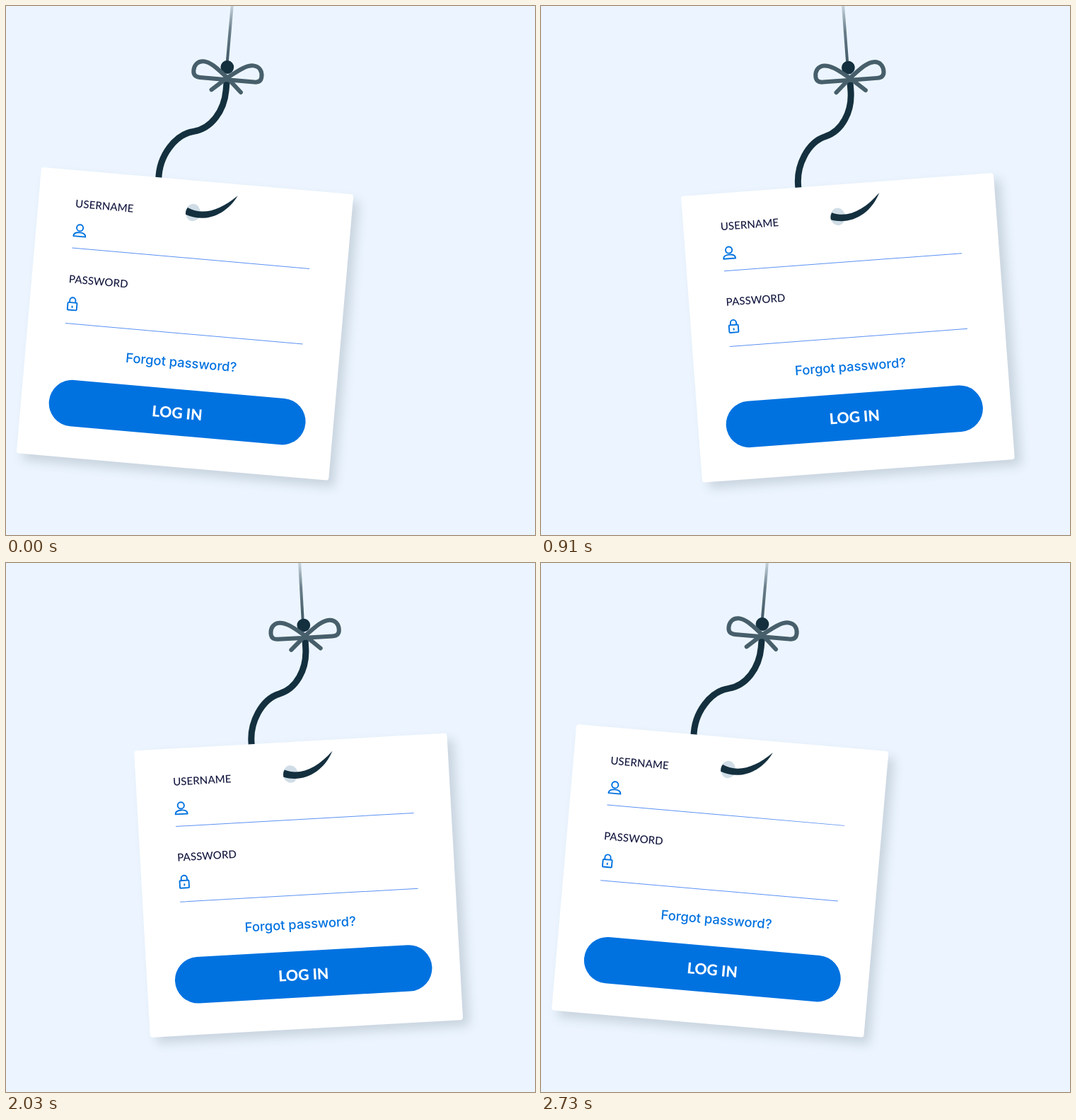
An HTML page for the animation above (2800 ms loop, 748x748 px).

```html
<!DOCTYPE html>
<html lang="en">
<head>
<meta charset="utf-8">
<title>Login on a hook</title>
<style>
  html, body { margin: 0; width: 100%; height: 100%; overflow: hidden; background: #ecf5ff; }
  svg { display: block; width: 100vw; height: 100vh; }
  text { font-family: Lato, sans-serif; }
  .label { font-size: 15px; font-weight: 500; letter-spacing: .1px; fill: #14183f; }
  .link { font: 500 18.4px Inter, sans-serif; fill: #0072e0; text-anchor: middle; }
  .action { font-size: 21.3px; font-weight: 800; fill: #fff; text-anchor: middle; }
  .icon { fill: none; stroke: #0072e0; stroke-width: 1.9; stroke-linejoin: round; }
  .bow { fill: none; stroke: #475f6b; stroke-width: 6; stroke-linecap: round; stroke-linejoin: round; }
</style>
</head>
<body>
<svg viewBox="0 0 748 748">
  <defs>
    <linearGradient id="fade" gradientUnits="userSpaceOnUse" x1="0" y1="0" x2="0" y2="75">
      <stop offset="0" stop-color="#475f6b" stop-opacity=".2"/>
      <stop offset=".5" stop-color="#475f6b" stop-opacity=".8"/>
      <stop offset="1" stop-color="#475f6b"/>
    </linearGradient>
    <filter id="blur" x="-20%" y="-20%" width="140%" height="140%">
      <feGaussianBlur stdDeviation="7.5"/>
    </filter>
    <path id="loop" d="M359 123L380 104C392 95 404 84 415 84C424 84 428 91 428 98C428 104 425 107 418 107H380"/>
  </defs>
  <g id="swing">
    <!-- line, bow and shank -->
    <rect x="375.7" y="-10" width="4" height="95" fill="url(#fade)"/>
    <circle cx="378.4" cy="89.3" r="9.4" fill="#14303f"/>
    <path d="M379.5 104V122C379.5 152 363 178 339 184C314 190 293 222 295.6 256" fill="none" stroke="#14303f" stroke-width="9"/>
    <g class="bow">
      <use href="#loop"/>
      <use href="#loop" transform="matrix(-1 0 0 1 759.5 0)"/>
    </g>

    <!-- card -->
    <rect x="138" y="262" width="443" height="406" rx="4" fill="#14303f" opacity=".17" filter="url(#blur)"/>
    <rect x="129" y="253" width="443" height="406" rx="4" fill="#fff"/>
    <ellipse cx="348" cy="298.3" rx="10.3" ry="12.3" fill="#d0dde6"/>
    <path d="M340 292C362 302 386 292 409 269C395 298 366 312 338 302Q337 296 340 292Z" fill="#14303f"/>

    <!-- form -->
    <text class="label" x="181.5" y="305.3">USERNAME</text>
    <text class="label" x="181.5" y="412.3">PASSWORD</text>
    <path d="M182 363H519M182 470H519" stroke="#5b92f3"/>
    <g class="icon">
      <circle cx="190.8" cy="333.9" r="4.6"/>
      <path d="M182.5 346C182.5 342 185.5 340.5 191 340.5S199.5 342 199.5 346Z"/>
      <rect x="183" y="440" width="13" height="10.6" rx="1"/>
      <path d="M185.4 440V437A4.1 4.1 0 0 1 193.6 437V440M189.5 444.5V447.5"/>
    </g>
    <text class="link" x="350" y="517.5">Forgot password?</text>
    <rect x="168.5" y="549" width="364" height="65.5" rx="32.75" fill="#0072e0"/>
    <text class="action" x="350.5" y="590.2">LOG IN</text>
  </g>
</svg>
<script>
  const LOOP = 2800, STEP = 70, SWING = 5, PIVOT = '378 -663';
  const swing = document.getElementById('swing');

  // Closed form of cubic-bezier(1, 0, 0, 1)
  function ease(x) {
    const s = 0.5 + Math.cbrt((x - 0.5) / 4);
    return s * s * (3 - 2 * s);
  }

  // The pose is held for each step, then jumps to the next
  function draw(now) {
    const held = Math.floor(now / STEP) * STEP;
    const phase = (held % LOOP) / LOOP * 2;
    const there = phase < 1 ? phase : 2 - phase;
    const angle = SWING * (1 - 2 * ease(there));
    swing.setAttribute('transform', `rotate(${angle} ${PIVOT})`);
  }

  const start = performance.now();
  function tick() {
    draw(performance.now() - start);
    requestAnimationFrame(tick);
  }
  tick();
</script>
</body>
</html>
```
